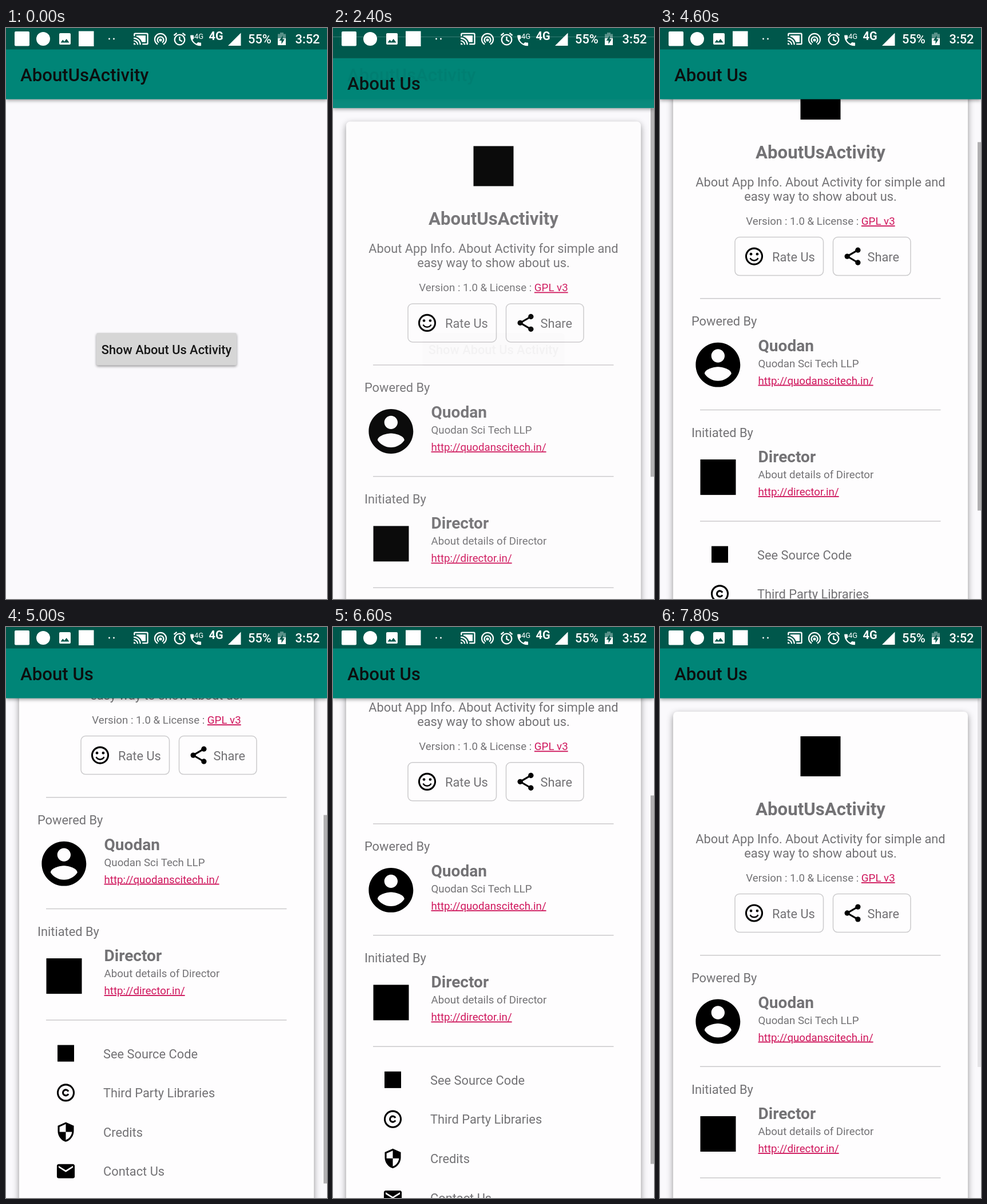
These frames come from a looping animation (561x998 px, 8000 ms). An HTML page:

```html
<!DOCTYPE html>
<html lang="en">
<head>
<meta charset="utf-8">
<title>About Us</title>
<style>
  html, body { margin: 0; width: 100%; height: 100%; overflow: hidden; background: #faf9fc; }
  svg { display: block; width: 100%; height: 100%; }
  text { font: 21.82px Roboto, sans-serif; fill: #737275; white-space: pre; }
  .bar { fill: #008577; filter: drop-shadow(0 2px 3px rgba(0,0,0,.4)); }
  .status { fill: #00574b; }
  .title { font-size: 31.17px; font-weight: 500; fill: #0c0f0f; }
  .mid { text-anchor: middle; }
  .head { font-size: 31.17px; font-weight: 700; }
  .name { font-size: 28.05px; font-weight: 700; }
  .small { font-size: 18.7px; }
  .link { fill: #cf165c; text-decoration: underline; }
  .card { fill: #fefdfe; filter: drop-shadow(0 4px 6px rgba(0,0,0,.42)); }
  .line { fill: none; stroke: #cbcacc; stroke-width: 1.5; }
  .ink { fill: none; stroke: #000; stroke-width: 2; }
  #button { fill: #d6d6d6; }
  #icons, #icons text { fill: #fff; }
  #icons text { font-weight: 500; }
  #icons .stroke { fill: none; stroke: #fff; stroke-width: 2.3; }
</style>
</head>
<body>
<svg viewBox="0 0 561 998" preserveAspectRatio="none">
  <defs>
    <clipPath id="view"><rect y="124" width="561" height="890"/></clipPath>
  </defs>

  <g id="home">
    <rect width="561" height="998" fill="#faf9fc"/>
    <rect class="bar" y="37" width="561" height="87.5"/>
    <rect class="status" width="561" height="37.5"/>
    <text class="title" x="25" y="93">AboutUsActivity</text>
    <rect id="button" x="158" y="533" width="245" height="56.500" rx="3"/>
    <text class="mid" x="280.5" y="570" style="font-weight:500;fill:#161616">Show About Us Activity</text>
  </g>

  <g id="about">
    <rect width="561" height="1014" fill="#faf9fc"/>
    <g clip-path="url(#view)">
      <g id="page">
        <rect class="card" x="23" y="148" width="515" height="1136" rx="7"/>
        <rect x="245.500" y="191" width="70" height="70"/>
        <text class="mid head" x="280.500" y="329">AboutUsActivity</text>
        <text class="mid" x="280.500" y="377.500">About App Info. About Activity for simple and</text>
        <text class="mid" x="280.500" y="403">easy way to show about us.</text>
        <text class="mid small" x="280.500" y="445">Version : 1.0 &amp; License : <tspan class="link">GPL v3</tspan></text>

        <g class="line">
          <rect x="131" y="466.500" width="154.500" height="67" rx="8"/>
          <rect x="302.500" y="466.500" width="135.500" height="67" rx="8"/>
          <path d="M70 573.700H490.500M70 768.300H490.500M70 962.800H490.500"/>
        </g>
        <g transform="translate(145.800 481.300) scale(1.558)">
          <circle class="ink" cx="12" cy="12" r="9"/>
          <circle cx="8.500" cy="9.500" r="1.500"/><circle cx="15.500" cy="9.500" r="1.500"/>
          <path class="ink" style="stroke-width:1.600" d="M7.500 14Q9 16.700 12 16.700T16.500 14"/>
        </g>
        <text x="196" y="508.500">Rate Us</text>
        <g transform="translate(317.800 481.300) scale(1.558)">
          <path class="ink" d="M18 5L6 12L18 19"/>
          <circle cx="18" cy="5" r="3"/><circle cx="6" cy="12" r="3"/><circle cx="18" cy="19" r="3"/>
        </g>
        <text x="362.500" y="508.500">Share</text>

        <text x="55" y="621">Powered By</text>
        <path transform="translate(54.600 642.800) scale(3.895)" d="M12 2C6.480 2 2 6.480 2 12s4.480 10 10 10 10-4.480 10-10S17.520 2 12 2zm0 3c1.660 0 3 1.340 3 3s-1.340 3-3 3-3-1.340-3-3 1.340-3 3-3zm0 14.200c-2.500 0-4.710-1.280-6-3.220.03-1.990 4-3.080 6-3.080 1.990 0 5.970 1.090 6 3.080-1.290 1.940-3.500 3.220-6 3.220z"/>
        <text class="name" x="171.500" y="665.500">Quodan</text>
        <text class="small" x="171.500" y="693.500">Quodan Sci Tech LLP</text>
        <text class="small link" x="171.500" y="723.500">http://quodanscitech.in/</text>

        <text x="55" y="815.500">Initiated By</text>
        <rect x="70.500" y="855" width="62" height="62"/>
        <text class="name" x="171.500" y="860">Director</text>
        <text class="small" x="171.500" y="888">About details of Director</text>
        <text class="small link" x="171.500" y="918">http://director.in/</text>

        <rect x="90" y="1006.500" width="29" height="29"/>
        <text x="170" y="1029.500">See Source Code</text>
        <g transform="translate(85.800 1071.100) scale(1.558)">
          <circle class="ink" cx="12" cy="12" r="9"/>
          <path class="ink" d="M14.900 10.600A3.200 3.200 0 1 0 14.900 13.400"/>
        </g>
        <text x="170" y="1098">Third Party Libraries</text>
        <path transform="translate(85.800 1139.800) scale(1.558)" d="M12 1L3 5v6c0 5.550 3.840 10.740 9 12 5.160-1.260 9-6.450 9-12V5l-9-4zm0 11h7c-.53 4.120-3.280 7.790-7 8.940V12H5V6.300l7-3.110z"/>
        <text x="170" y="1166.700">Credits</text>
        <path transform="translate(85.800 1208.300) scale(1.558)" d="M20 4H4c-1.100 0-2 .9-2 2v12c0 1.100.9 2 2 2h16c1.100 0 2-.9 2-2V6c0-1.100-.9-2-2-2zm0 4l-8 5-8-5V6l8 5 8-5z"/>
        <text x="170" y="1235.300">Contact Us</text>
      </g>
      <rect id="thumb" x="555" y="125" width="6" height="644" fill="#b1b0b2"/>
      <path id="glow" d="M0 989Q280.500 945 561 989V998H0Z" fill="#008577"/>
    </g>
    <rect class="bar" y="37" width="561" height="87.500"/>
    <rect class="status" width="561" height="37.500"/>
    <text class="title" x="25" y="93">About Us</text>
  </g>

  <g id="icons">
    <rect x="15" y="6" width="26" height="25.500" rx="2"/>
    <circle cx="65" cy="19" r="12"/>
    <path fill-rule="evenodd" d="M95 9h16a2 2 0 0 1 2 2v16a2 2 0 0 1-2 2H95a2 2 0 0 1-2-2V11a2 2 0 0 1 2-2zM95.500 25.500h15l-4.800-6.500-3.700 4.800-2.700-3.200z"/>
    <rect x="127" y="5.500" width="26.500" height="26.500"/>
    <circle cx="180.500" cy="19" r="1.400"/><circle cx="188.500" cy="19" r="1.400"/>
    <path transform="translate(222 5) scale(1.160)" d="M1 18v3h3c0-1.660-1.340-3-3-3zm0-4v2c2.760 0 5 2.240 5 5h2c0-3.870-3.130-7-7-7zm18-7H5v1.630c3.960 1.280 7.090 4.410 8.370 8.370H19zM1 10v2c4.970 0 9 4.030 9 9h2c0-6.080-4.930-11-11-11zm20-7H3c-1.100 0-2 .9-2 2v3h2V5h18v14h-7v2h7c1.100 0 2-.9 2-2V5c0-1.100-.9-2-2-2z"/>
    <circle cx="270" cy="21" r="2.500"/>
    <path class="stroke" d="M265 28.500A10 10 0 1 1 275 28.500M267 25.500A5.500 5.500 0 1 1 273 25.500"/>
    <circle class="stroke" cx="303.500" cy="20.500" r="8.800"/>
    <path class="stroke" d="M303.500 15V21L308 23.500M293.500 13L298.500 8.800M313.500 13L308.500 8.800"/>
    <path transform="translate(319 9.300) scale(1.050)" d="M6.620 10.790c1.440 2.830 3.760 5.140 6.590 6.590l2.200-2.200c.27-.27.67-.36 1.020-.24 1.120.37 2.330.57 3.570.57.55 0 1 .45 1 1V20c0 .55-.45 1-1 1-9.390 0-17-7.610-17-17 0-.55.45-1 1-1h3.500c.55 0 1 .45 1 1 0 1.250.2 2.450.57 3.570.11.35.03.74-.25 1.020z"/>
    <text x="329" y="19" style="font-size:13px;font-weight:400">4G</text>
    <text x="354.500" y="21" style="font-size:20px;font-weight:700">4G</text>
    <path d="M388 31L410.500 8.500V31Z"/>
    <text x="423" y="27">55%</text>
    <path d="M475 18V10.500H479V8H485V10.500H489V18Z" opacity=".35"/>
    <path d="M475 18H489V30H475Z"/>
    <path class="status" d="M484 13L477.500 22H481.500V28L487 19.500H483.500Z"/>
    <text x="505.500" y="27">3:52</text>
  </g>
</svg>
<script>
const LOOP = 8000, STEP = 200, MAX = 310;
const $ = id => document.getElementById(id);
const clamp = v => Math.min(1, Math.max(0, v));
const ramp = (t, a, b) => clamp((t - a) / (b - a));
const ease = u => u * u * (3 - 2 * u);

const scrollAt = t => MAX * (ease(ramp(t, 4230, 5200)) - ease(ramp(t, 6220, 7360)));

// The scrollbar fades after each rest and returns when scrolling resumes.
function thumbAlpha(t) {
  const [from, to] = t < 4230 ? [3740, 3990] : t < 6220 ? [5740, 5990] : [7625, 7875];
  return 1 - ramp(t, from, to);
}

function draw(now) {
  const t = Math.floor(now % LOOP / STEP) * STEP;

  const press = ramp(t, 1500, 1800) - 0.7 * ramp(t, 1800, 2000);
  const grey = Math.round(214 - 24 * press);
  $('button').style.fill = `rgb(${grey},${grey},${grey})`;
  $('button').style.filter = `drop-shadow(0 ${2 + 2 * press}px ${2 + press}px rgba(0,0,0,.4))`;

  const enter = ramp(t, 2200, 2410);
  $('about').style.display = t < 2400 ? 'none' : '';
  $('about').setAttribute('opacity', enter);
  $('about').setAttribute('transform', `translate(0 ${t < 2600 ? 15.4 : 0})`);

  const y = scrollAt(t);
  $('page').setAttribute('transform', `translate(0 ${-y})`);
  $('thumb').setAttribute('y', 125 + y * 873 / 1183);
  $('thumb').setAttribute('opacity', thumbAlpha(t));
  $('glow').setAttribute('opacity', 0.08 * ramp(t, 5200, 5400) * (1 - ramp(t, 5600, 5900)));

  requestAnimationFrame(loop);
}

let start;
function loop(now) {
  start ??= now;
  draw(now - start);
}
draw(0);
</script>
</body>
</html>
```
